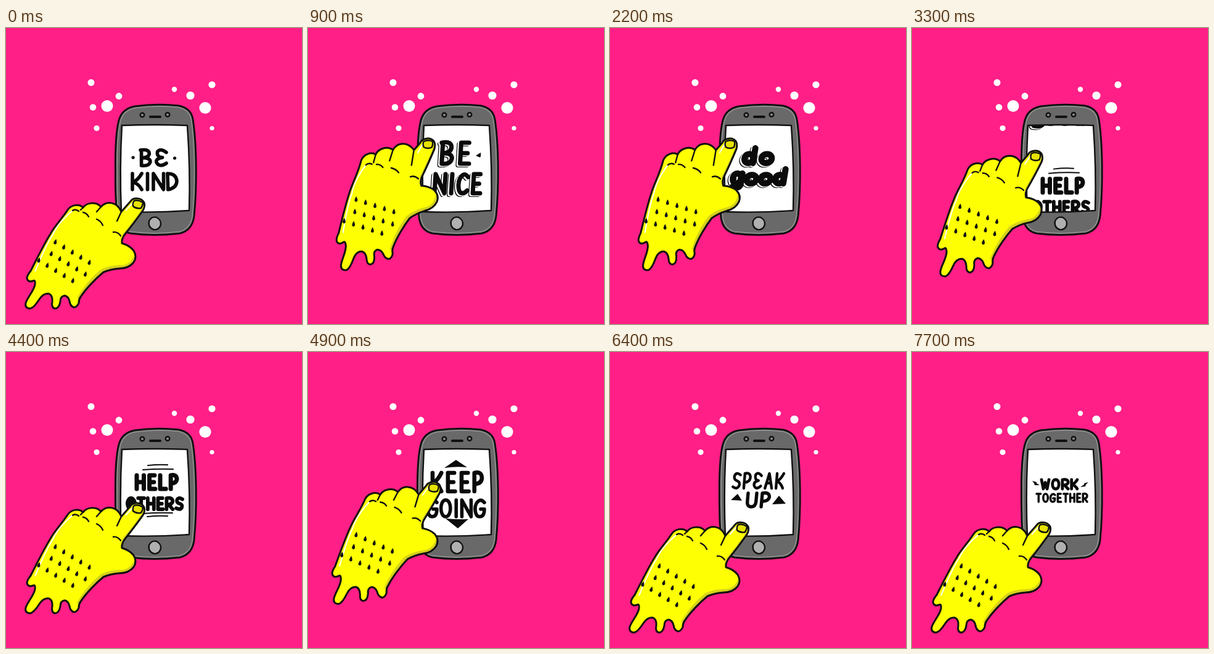
These frames come from a looping animation (480 px wide and 480 px high, 8000 ms). An HTML page:

```html
<!DOCTYPE html>
<html lang="en">
<head>
<meta charset="utf-8">
<title>Kind messages</title>
<style>
  html, body { margin: 0; width: 100%; height: 100%; overflow: hidden; background: #ff1f87; }
  svg { display: block; width: 100vw; height: 100vh; }
  .ink { fill: none; stroke: #111; stroke-width: 3; stroke-linecap: round; stroke-linejoin: round; }
  .fine { stroke-width: 2.4; }
</style>
</head>
<body>
<svg viewBox="0 0 480 480">
  <defs>
    <path id="body" d="M177.500 235C177 195 179 165 183 150Q188 131 209 127Q245 122 280 126Q300 130 303 148C309 187 310 255 305 305Q302 328 282 333Q240 338 202 333Q183 329 180 307Q177 270 177.500 235Z"/>
    <path id="glass" d="M188 158Q242 156 294 158Q299 228 297 296Q242 300 187 298Q184 228 188 158Z"/>
    <path id="skin"/>
    <clipPath id="bodyClip"><use href="#body"/></clipPath>
    <clipPath id="glassClip"><use href="#glass"/></clipPath>
    <clipPath id="skinClip"><use href="#skin"/></clipPath>
  </defs>

  <rect width="480" height="480" fill="#ff1f87"/>
  <g id="bubbles" fill="#fff"></g>

  <use href="#body" fill="#696969"/>
  <use href="#body" clip-path="url(#bodyClip)" fill="none" stroke="#8f8f8f" stroke-width="7"/>
  <use href="#body" class="ink"/>
  <use href="#glass" fill="#fff"/>
  <g id="cards" clip-path="url(#glassClip)"></g>
  <use href="#glass" class="ink fine"/>
  <g class="ink fine">
    <circle cx="221" cy="141" r="3.3" fill="#888"/>
    <circle cx="262" cy="140.500" r="3.3" fill="#888"/>
    <path d="M234 144H250" stroke-width="4"/>
    <path d="M232 313Q236 305 244 307Q252 311 251 319Q248 328 240 327Q230 324 232 313Z" fill="#b0b0b0"/>
  </g>

  <g id="hand">
    <use href="#skin" fill="#fdff02"/>
    <g clip-path="url(#skinClip)" fill="none">
      <path d="M211 372Q203 390 184 389Q168 390 157 395C145 404 129 422 119 440" stroke="#d5d21c" stroke-width="9"/>
      <path d="M224 292Q207 316 190 336" stroke="#d5d21c" stroke-width="4"/>
      <path d="M108 296C94 308 82 321 76 335C65 351 55 376 47 395" stroke="#fff" stroke-width="2"/>
      <path d="M194 296L206 283" stroke="#fff" stroke-width="2"/>
    </g>
    <use href="#skin" class="ink"/>
    <g class="ink fine">
      <path d="M206 289Q205 283 208 280Q215 278 222 283Q222 288 219 292Q212 294 206 289Z" fill="#e6e300"/>
      <path d="M108 296Q113 293 118 297M125 299Q131 300 134 306M147 310Q154 313 157 320M174 331Q181 330 186 337"/>
    </g>
    <path id="folds" class="ink fine"/>
    <g id="drops" fill="#111"></g>
  </g>
</svg>

<script>
const $ = id => document.getElementById(id);

function add(parent, tag, attrs) {
  const el = document.createElementNS('http://www.w3.org/2000/svg', tag);
  for (const k in attrs) el.setAttribute(k, attrs[k]);
  return parent.appendChild(el);
}

const dot = (cx, cy, r) => add($('bubbles'), 'circle', { cx, cy, r });
dot(138, 88.5, 5.5); dot(141, 128.5, 5.3); dot(164, 126.5, 9.5); dot(183, 110.5, 5.4); dot(147, 162.5, 4.6);
dot(273, 99.5, 4.2); dot(299, 109.5, 6.6); dot(334, 92, 5.6); dot(323, 129.5, 9.6); dot(334, 162.5, 3.6);

for (let row = 0; row < 3; row++)
  for (let i = 0; i < 5; i++) {
    const col = i - (row >> 1);
    const x = 80 + col * 13.8 - row * 6.5, y = 347 + col * 8.3 + row * 19;
    add($('drops'), 'path', { d: 'M0-5Q3 0 2.3 2.400Q0 5.500-2.300 2.400Q-3 0 0-5Z', transform: `translate(${x} ${y}) rotate(16)` });
  }

// Pen strokes on a 10 by 10 box
const BOWL = 'M0,10L0,0Q10,-1 10,3Q9,6 0,6';
const ARC = 'M10,1.5Q7,-0.5 4,0.5Q0,2 0,5.5Q0.5,10 5,10';
const GLYPH = {
  A: 'M0,10L5,0L10,10M2,6.5L8,6.5',
  B: 'M1,0L1,10M0,0Q9,-1 9,2.5Q8,5 2,5Q10,5 10,7.5Q9,10.5 1,10',
  C: ARC + 'Q8,10 10,8.5',
  D: 'M0,0L0.5,10Q10,9 10,4.5Q9,0 0,0',
  E: 'M9,0L1,0L1,10L10,10M1,5L8,5',
  e: 'M10,1.5Q4,-1.5 1,1Q0,4.5 6,4.8Q-1,5.5 0,8Q3,11.5 10,8.5',
  G: ARC + 'Q10,10 10,5.5L6,5.5',
  H: 'M0,0L0,10M10,0L10,10M0,5L10,5',
  I: 'M5,0L5,10',
  K: 'M0,0L0,10M10,0Q6,4 1,5.3Q7,6.5 10,10',
  L: 'M0,0L0,10L10,10',
  N: 'M0,10L0,0L10,10L10,0',
  O: 'M5,0C11.5,0 11.5,10 5,10C-1.5,10 -1.5,0 5,0',
  P: BOWL,
  R: BOWL + 'M4,6L10,10',
  S: 'M10,1Q3,-1.5 1,2Q1,4.5 6,5Q11,6 9,8.5Q6,11 0,9',
  T: 'M0,0L10,0M5,0L5,10',
  U: 'M0,0L0,6Q0,10 5,10Q10,10 10,6L10,0',
  W: 'M0,0L2.5,10L5,3L7.5,10L10,0',
  d: 'M9.5,0L9,10M4.5,4C10,4 10,10 4.5,10C-1,10 -1,4 4.5,4',
  g: 'M4.5,3C10,3 10,10 4.5,10C-1,10 -1,3 4.5,3M9.5,3L9,11Q8,13.5 1,12.5',
  o: 'M5,4C11.5,4 11.5,10 5,10C-1.5,10 -1.5,4 5,4'
};
const WIDTH = { I: 0.4, W: 1.3, O: 1.15, G: 1.1, N: 1.1, L: 0.8, P: 0.85, E: 0.9 };
const widthOf = c => WIDTH[c] || 1;

// One row of letters spread from x0 to x1
function row(word, x0, x1, y, h, pen, { lean = 0, gap = 1.15 } = {}) {
  const space = pen * gap;
  const total = [...word].reduce((sum, c) => sum + widthOf(c), 0);
  const unit = (x1 - x0 - space * (word.length - 1)) / total;
  let x = x0, d = '';
  for (const c of word) {
    const w = unit * widthOf(c);
    d += GLYPH[c].replace(/(-?[\d.]+),(-?[\d.]+)/g, (_, u, v) =>
      `${(x + u * w / 10 + lean * (5 - v)).toFixed(1)},${(y + v * h / 10).toFixed(1)}`);
    x += w + space;
  }
  return { d, pen };
}

const SLANT = { lean: 0.2 }, WIDE = { lean: 0.2, gap: 1.7 }, FAT = { lean: 0.3, gap: 0.7 };
const CARDS = [
  { label: 'Be kind',
    rows: [row('Be', 218, 260, 198, 25, 5.6, { gap: 1.8 }), row('KIND', 205, 277, 236, 26, 5.6)],
    marks: 'M203.500 210a2.600 2.600 0 1 0 5.200 0a2.600 2.600 0 1 0-5.200 0M271 211a2.600 2.600 0 1 0 5.200 0a2.600 2.600 0 1 0-5.200 0' },
  { label: 'Be nice', echo: true,
    rows: [row('BE', 216, 262, 186, 34, 7, WIDE), row('NICE', 206, 280, 237, 31, 7, SLANT)],
    marks: 'M272 207L280 202Q281 207 279 210Z' },
  { label: 'Do good', echo: true,
    rows: [row('do', 218, 263, 195, 24, 10, { lean: 0.3, gap: 1.1 }), row('good', 199, 284, 229, 23, 10, FAT)] },
  { label: 'Help others',
    rows: [row('HELP', 212, 277, 200, 22, 7), row('OTHERS', 197, 286, 237, 18, 5.8, { gap: 1 }),
           { d: 'M230 184Q246 182 262 183M222 191Q246 189 271 190M222 262Q246 260 270 261M229 267Q246 265 262 266', pen: 2 }],
    marks: 'M194 245a9 10 0 1 0 18 0a9 10 0 1 0-18 0' },
  { label: 'Keep going',
    rows: [row('KEEP', 202, 282, 196, 30, 6.6, { gap: 1.4 }), row('GOING', 194, 286, 240, 27, 5.6)],
    marks: 'M221 188L240 175L258 187Q240 185 221 188ZM223 270Q242 272 260 271L243 286Z' },
  { label: 'Speak up',
    rows: [row('SPeAK', 200, 281, 197, 24, 4.4, { lean: 0.2, gap: 1.6 }), row('UP', 223, 258, 229, 22, 5.4, WIDE)],
    marks: 'M196 240L207 230L214 241ZM263 247L274 233L285 246Z' },
  { label: 'Work together',
    rows: [row('WORK', 210, 268, 207, 15, 4.8), row('TOGETHER', 202, 284, 230, 13, 3.5)],
    marks: 'M195 209L202 211L202 213L207 216L199 216L198 213ZM286 211L279 213L279 215L273 219L281 218L282 215Z' }
];

const cards = CARDS.map(({ label, rows, marks, echo }) => {
  const g = add($('cards'), 'g', { role: 'img', 'aria-label': label });
  const write = (color, dx, dy) => rows.forEach(({ d, pen }) => add(g, 'path', {
    d, class: 'ink', style: `stroke:${color};stroke-width:${pen}`, transform: `translate(${dx} ${dy})`
  }));
  if (echo) {
    write('#0b0b0b', -3.6, 2.4);
    write('#fff', -2.3, 1.5);
  }
  write('#0b0b0b', 0, 0);
  if (marks) add(g, 'path', { d: marks, fill: '#0b0b0b' });
  return g;
});

// Hand outline; reach stretches the three curled fingers
function shapeHand(reach) {
  const f = (x, y) => `${x + reach * 0.3} ${y - reach} `;
  $('skin').setAttribute('d',
    'M' + f(100, 295) + 'C' + f(106, 286) + f(119, 285) + f(125, 291) +
    'C' + f(131, 283) + f(146, 281) + f(154, 290) + 'C' + f(163, 280) + f(180, 281) + f(187, 298) +
    'L202 281C206 275 219 274 224 283Q226 289 222 296Q207 317 194 333Q187 341 188 349' +
    'Q201 353 207 361Q213 371 207 380Q199 390 184 390Q170 391 158 396C147 405 130 422 121 436' +
    'Q118 440 118 446Q115 453 110 453Q104 451 103 443Q101 435 95 434Q88 435 88 444Q86 455 79 455' +
    'Q73 453 75 444Q76 434 70 431Q61 429 54 440Q45 454 39 455Q30 454 32 446C35 436 45 427 47 416' +
    'Q48 408 44 410Q36 413 34 406Q34 401 40 394C49 376 62 350 72 334C79 321 91 309 ' + f(100, 295) + 'Z');
  $('folds').setAttribute('d', `M${f(125, 291)}L121 295M${f(154, 290)}L147 298M${f(187, 298)}L180 313`);
}

const LOOP = 8000, FIRST = 500, EVERY = 1300, STEP = 100, PAGE = 145, RISE = 5, FALL = 3;

// How far the hand is raised, 0 to 1, on each step of a swipe
function lift(step) {
  if (step < RISE) return 1 - (1 - (step + 1) / RISE) ** 1.7;
  return Math.max(0, 1 - (step + 1 - RISE) / FALL);
}

function draw(time) {
  const t = time % LOOP - FIRST;
  const turn = Math.floor(t / EVERY);
  const step = t < 0 ? RISE + FALL : Math.floor((t - turn * EVERY) / STEP);
  const up = lift(step);
  const swipe = Math.max(0, (up - lift(0)) / (1 - lift(0)));
  const page = t < 0 ? 0 : turn + (step < RISE ? swipe : 1);
  shapeHand(8 * swipe);
  $('hand').setAttribute('transform', `translate(${-2 * swipe} ${-99 * up}) rotate(${-13 * swipe} 212 362)`);
  cards.forEach((g, i) => {
    const dy = (i - page) * PAGE;
    g.setAttribute('transform', `translate(0 ${dy})`);
    g.style.display = Math.abs(dy) < PAGE ? '' : 'none';
  });
}

const start = performance.now();
function tick() {
  draw(performance.now() - start);
  requestAnimationFrame(tick);
}
tick();
</script>
</body>
</html>
```
